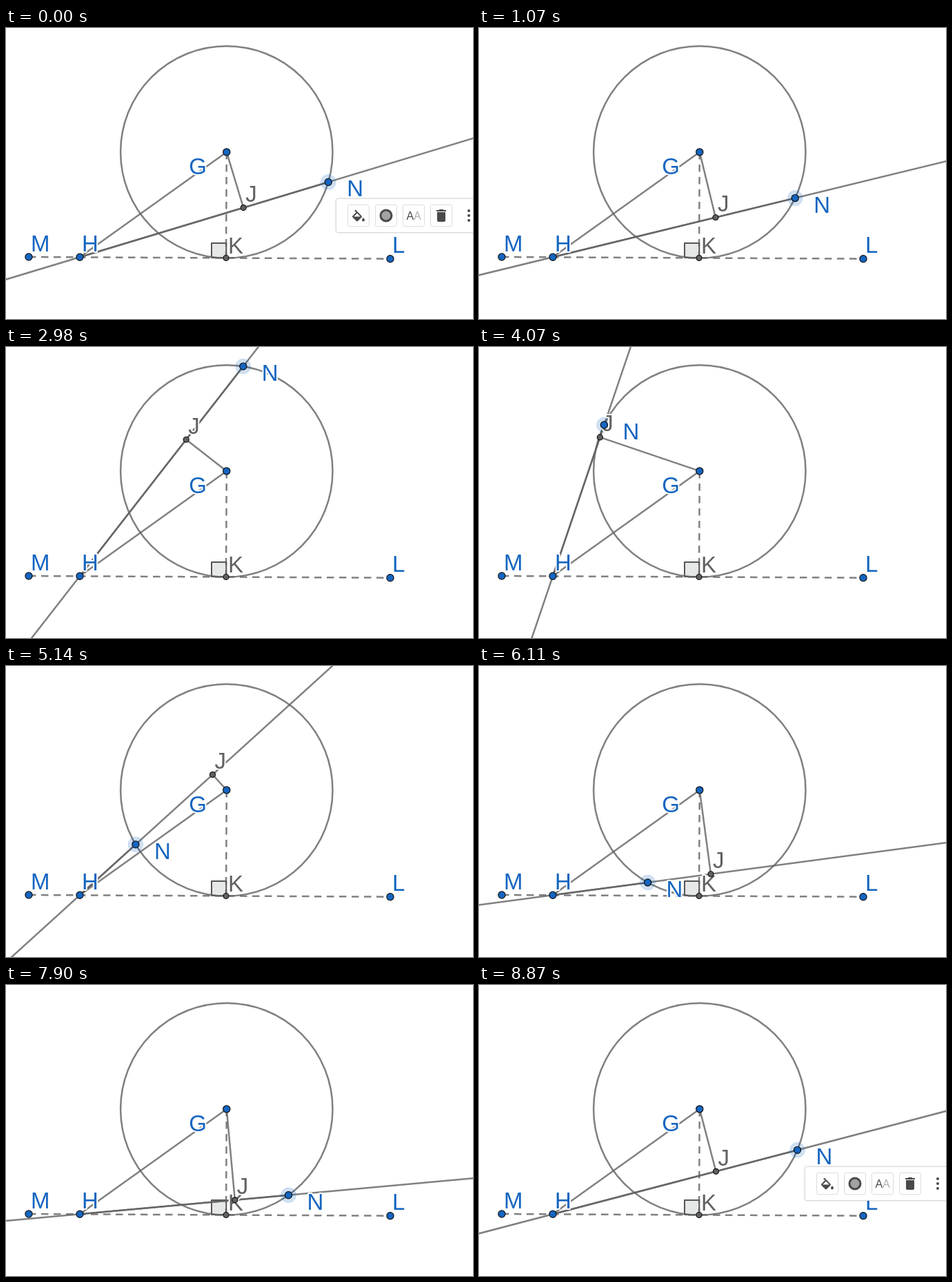
An HTML page with a canvas that plays this animation: 677x422 px, repeating every 9750 ms.

```html
<!DOCTYPE html>
<html lang="en">
<head>
<meta charset="utf-8">
<title>Secant and circle</title>
<style>
html, body { margin: 0; width: 100%; height: 100%; overflow: hidden; background: #fff; }
canvas { display: block; width: 677px; height: 422px; }
</style>
</head>
<body>
<canvas id="stage" width="677" height="422"></canvas>
<script>
const ctx = document.getElementById('stage').getContext('2d');
const LOOP = 9750, DRAG_START = 830, DRAG_END = 8870, STEP = 120;
const BLUE = '#1565c0', GRAY = '#616161', LINE = 'rgba(97,97,97,0.8)', ICON = '#4a4a4a';
const FONT = '"Liberation Sans", Arial, sans-serif';

const G = { x: 319.8, y: 179.9 }, R = 153.7;
const H = { x: 107, y: 332.3 }, K = { x: 319, y: 333.5 };
const M = { x: 33, y: 332 }, L = { x: 557, y: 334.7 };

// Drag path: [step, angle of N in degrees, counterclockwise]
const drag = [
  [-1, -16.46], [6, -40], [7, -40], [8, -35], [16, 51.8], [17, 67], [18, 81],
  [25, 140], [34, 199], [36, 210.9], [43, 233.4], [44, 240.7], [48, 258],
  [49, 258], [59, 305.7], [65, 336.7], [66, 336.7], [67, 337.25]
];
const slope = i => (drag[i + 1][1] - drag[i][1]) / (drag[i + 1][0] - drag[i][0]);

function tangent(i) {
  if (i === 0 || i === drag.length - 1) return 0;
  const a = slope(i - 1), b = slope(i);
  return a * b > 0 ? 2 * a * b / (a + b) : 0;
}

function angleAt(k) {
  let i = 0;
  while (i < drag.length - 2 && k >= drag[i + 1][0]) i++;
  const [k0, a0] = drag[i], [k1, a1] = drag[i + 1];
  const h = k1 - k0, u = (k - k0) / h, v = 1 - u;
  return a0 * (1 + 2 * u) * v * v + a1 * u * u * (3 - 2 * u)
    + h * u * v * (tangent(i) * v - tangent(i + 1) * u);
}

function stepAt(t) {
  if (t < DRAG_START) return -1;
  if (t >= DRAG_END) return 67;
  return Math.min(66, Math.floor((t - DRAG_START + 10) / STEP));
}

function line(a, b, dash = []) {
  ctx.setLineDash(dash);
  ctx.strokeStyle = LINE;
  ctx.lineWidth = 2.5;
  ctx.beginPath();
  ctx.moveTo(a.x, a.y);
  ctx.lineTo(b.x, b.y);
  ctx.stroke();
  ctx.setLineDash([]);
}

function disc(x, y, r, fill, stroke, width = 1) {
  ctx.beginPath();
  ctx.arc(x, y, r, 0, 2 * Math.PI);
  if (fill) { ctx.fillStyle = fill; ctx.fill(); }
  if (stroke) { ctx.strokeStyle = stroke; ctx.lineWidth = width; ctx.stroke(); }
}

function point(p, color, name, dx = 3, dy = -8.5) {
  disc(p.x, p.y, color === BLUE ? 5.1 : 4, color, '#111', 1.2);
  ctx.font = '33px ' + FONT;
  ctx.lineJoin = 'round';
  ctx.lineWidth = 4;
  ctx.strokeStyle = '#fff';
  ctx.strokeText(name, p.x + dx, p.y + dy);
  ctx.fillStyle = color;
  ctx.fillText(name, p.x + dx, p.y + dy);
}

function box(x, y, w, h, r, border) {
  ctx.beginPath();
  ctx.roundRect(x, y, w, h, r);
  ctx.fillStyle = '#fff';
  ctx.fill();
  ctx.shadowColor = 'transparent';
  ctx.strokeStyle = border;
  ctx.lineWidth = 1;
  ctx.stroke();
}

const bucket = new Path2D('M16.5 9L7.6 0 6.2 1.4 8.6 3.8 3.4 9Q2.5 10 3.4 11L9 16.6Q10 17.4 11 16.6L16.5 11Q17.4 10 16.5 9ZM5.2 10L10 5.2 14.8 10ZM19 11.5Q17 13.8 17 15A2 2 0 0 0 21 15Q21 13.8 19 11.5Z');
const bin = new Path2D('M6 7H18V19Q18 21 16 21H8Q6 21 6 19ZM5 4H8.5L9.5 3H14.5L15.5 4H19V6H5Z');

function icon(path, x, y) {
  ctx.save();
  ctx.translate(x, y);
  ctx.fillStyle = ICON;
  ctx.fill(path, 'evenodd');
  ctx.restore();
}

function toolbar(x, y) {
  ctx.save();
  ctx.translate(x, y);
  ctx.shadowColor = 'rgba(0,0,0,0.22)';
  ctx.shadowBlur = 3;
  box(0.5, 0.5, 230, 49, 3, '#dadada');
  for (let i = 0; i < 4; i++) box(17.5 + 40 * i, 9.5, 31, 31, 2, '#dcdcdc');
  icon(bucket, 21, 16.5);
  disc(73, 25, 8, '#a3a3a3', ICON, 3);
  ctx.font = '16px ' + FONT;
  ctx.fillStyle = ICON;
  ctx.fillText('A', 102.5, 30.5);
  ctx.fillStyle = '#b0b0b0';
  ctx.fillText('A', 113, 30.5);
  icon(bin, 141, 13);
  for (const dy of [18, 25, 32]) disc(193, dy, 2, ICON);
  ctx.restore();
}

function draw(t) {
  const a = angleAt(stepAt(t)) * Math.PI / 180;
  const N = { x: G.x + R * Math.cos(a), y: G.y - R * Math.sin(a) };
  const len = Math.hypot(N.x - H.x, N.y - H.y);
  const ux = (N.x - H.x) / len, uy = (N.y - H.y) / len;
  const along = d => ({ x: H.x + ux * d, y: H.y + uy * d });
  // Foot of the perpendicular from the centre
  const J = along((G.x - H.x) * ux + (G.y - H.y) * uy);

  ctx.fillStyle = '#fff';
  ctx.fillRect(0, 0, 677, 422);

  ctx.fillStyle = '#e5e8e7';
  ctx.fillRect(298, 312, 21, 21);
  ctx.strokeStyle = '#555';
  ctx.lineWidth = 2;
  ctx.strokeRect(298, 312, 21.3, 21);

  disc(G.x, G.y, R, null, LINE, 2.5);
  line(M, L, [10.5, 7.5]);
  line(G, K, [10.5, 7.5]);
  line(G, H);
  line(G, J);
  line(along(-900), along(900));
  line(H, N);

  disc(N.x, N.y, 11, 'rgba(21,101,192,0.2)', 'rgba(21,101,192,0.1)');
  point(G, BLUE, 'G', -54.5, 32.5);
  point(H, BLUE, 'H');
  point(K, GRAY, 'K', 3, -7);
  point(J, GRAY, 'J');
  point(L, BLUE, 'L');
  point(M, BLUE, 'M');
  point(N, BLUE, 'N', 27, 21);

  if (t < DRAG_START || t >= DRAG_END) {
    toolbar(Math.round(N.x + 10.7), Math.round(N.y + 24));
  }
}

const start = performance.now();
function tick() {
  draw((performance.now() - start) % LOOP);
  requestAnimationFrame(tick);
}
tick();
</script>
</body>
</html>
```
